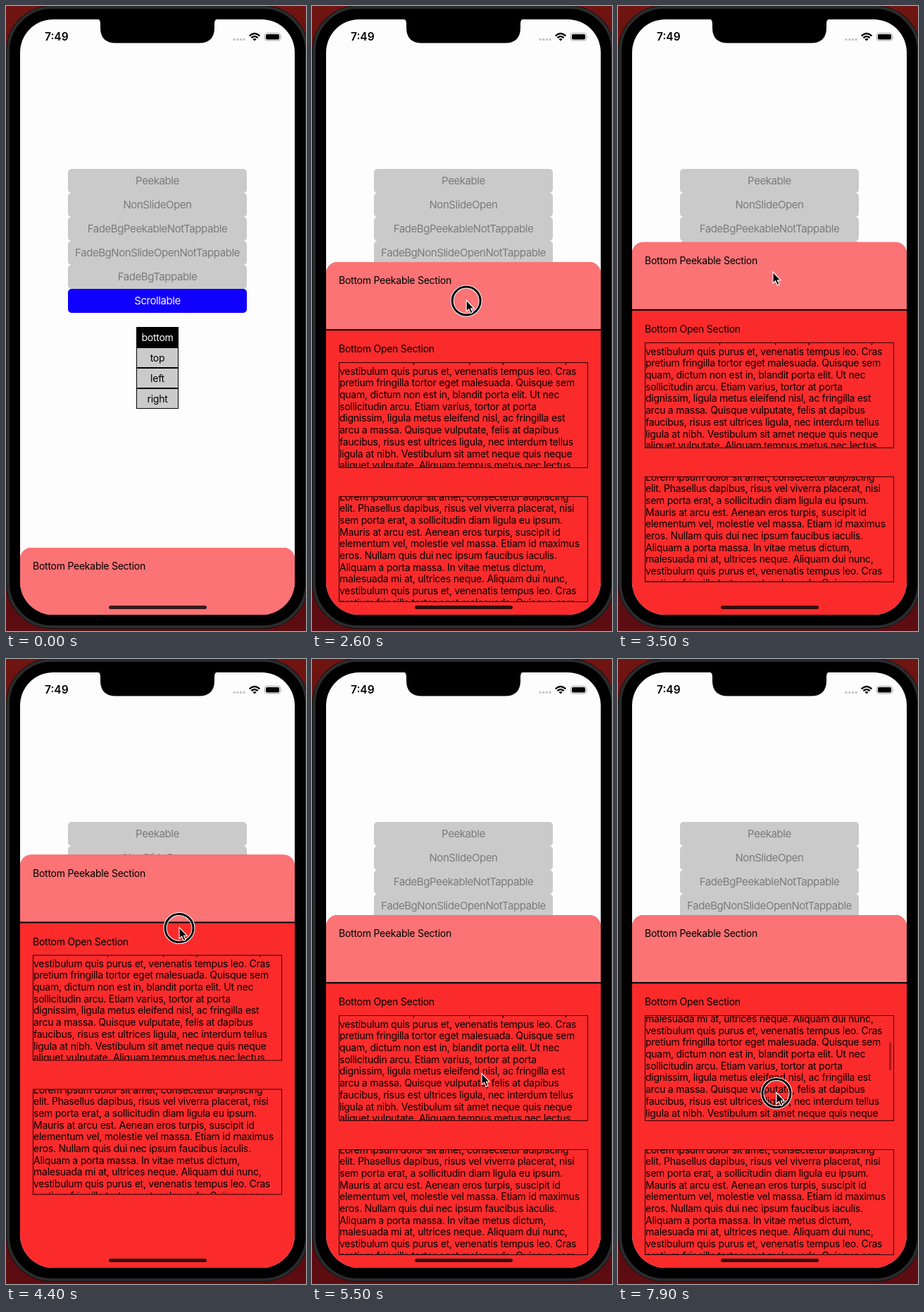
An HTML page that plays this animation: 426 px wide and 886 px high, repeating every 8000 ms.

```html
<!DOCTYPE html>
<html lang="en">
<head>
<meta charset="utf-8">
<title>Bottom drawer</title>
<style>
  html, body { margin: 0; width: 100%; height: 100%; overflow: hidden; }
  body {
    position: relative;
    background: linear-gradient(#701511, #4c0c10 30%, #4c0c10 70%, #5e0d11);
    font: 14px/16.7px Inter, "Liberation Sans", sans-serif;
    letter-spacing: -.25px;
    color: #000;
  }
  body * { box-sizing: border-box; }
  .abs, .phone, .screen, .modes, .sides, .sheet, .sheet > *, .pointer { position: absolute; }

  .phone {
    left: 1px; top: 0; width: 428px; height: 882px;
    border: 4px solid #2b2b2d; border-radius: 64px;
    background: #000;
    box-shadow: 0 0 0 1px #111;
  }
  .screen {
    left: 20px; top: 19px; width: 390px; height: 844px;
    border-radius: 47px; overflow: hidden; background: #fdfdfd;
  }

  .modes { left: 68px; top: 212px; width: 254px; }
  .modes div {
    height: 34px; border-radius: 5px; background: #cacaca; color: #7b7b7b;
    font-size: 15px; line-height: 34px; letter-spacing: -.43px;
    text-align: center; white-space: nowrap;
  }
  .modes .on { background: #1000ff; color: #f4f2ff; }

  .sides { left: 165px; top: 436px; width: 60px; }
  .sides div {
    height: 29px; border: 1px solid #000; background: #cacaca;
    line-height: 27px; text-align: center;
  }
  .sides .on { background: #000; color: #fff; }

  .sheet {
    left: 0; top: -19px; width: 390px; height: 900px;
    border-radius: 16px 16px 0 0; overflow: hidden; background: #fb2b2c;
  }
  .peek { left: 0; top: 0; width: 100%; height: 97px; background: #fb7375; border-bottom: 2px solid #000; }
  .label { left: 18px; white-space: nowrap; }
  .list { left: 18px; width: 354px; height: 150px; border: 1px solid #2c0405; overflow: hidden; }
  .copy { position: absolute; left: 0; white-space: pre; }
  .thumb {
    position: absolute; right: 3px; top: 37px; width: 3px; height: 40px;
    border-radius: 2px; background: #a81a1c;
  }

  svg { position: absolute; left: 0; top: 0; overflow: visible; }
  .time { left: 55px; top: 34px; font-size: 15.5px; line-height: 20px; font-weight: 600; letter-spacing: 0; }
  .home { left: 146px; top: 850px; width: 139px; height: 5px; border-radius: 3px; background: #000; opacity: .78; }
  .pointer { left: 0; top: 0; }
</style>
</head>
<body>
<div class="phone"></div>
<div class="screen">
  <div class="modes"></div>
  <div class="sides"></div>
  <div class="sheet">
    <div class="peek"></div>
    <div class="label" style="top:18px">Bottom Peekable Section</div>
    <div class="label" style="top:115px">Bottom Open Section</div>
    <div class="list" style="top:142px"><div class="copy" id="first"></div><div class="thumb"></div></div>
    <div class="list" style="top:332px"><div class="copy" id="second" style="top:-8.5px"></div></div>
  </div>
</div>

<svg width="426" height="886">
  <path d="M128 18Q134 18 134 25V30.5Q134 52.5 156 52.5H274Q296 52.5 296 30.5V25Q296 18 302 18Z"/>
  <path d="M324 47.5H339" stroke="#c4c4c4" stroke-width="3.4" stroke-linecap="round" stroke-dasharray="0 4.7"/>
  <g fill="none" stroke="#000" stroke-width="2.3">
    <path d="M345.7 42.3Q353 35.6 360.3 42.3"/>
    <path d="M348.4 45.2Q353 41 357.6 45.2"/>
  </g>
  <path d="M353 49.6L350.4 46.9Q353 44.9 355.6 46.9Z"/>
  <rect x="367.5" y="38.5" width="22" height="10.5" rx="3" fill="none" stroke="#a0a0a0"/>
  <rect x="369" y="40" width="19" height="7.5" rx="1.8"/>
  <path d="M391 42Q392.6 43.7 391 45.6Z" fill="#a0a0a0"/>
</svg>
<div class="abs time">7:49</div>
<div class="abs home"></div>

<div class="pointer">
  <svg width="1" height="1">
    <g class="ring" fill="none">
      <circle r="20" stroke="#fff" stroke-width="5"/>
      <circle r="20" stroke="#000" stroke-width="3"/>
    </g>
    <path d="M0 -1V15L3.6 11.7L6.3 17.8L9 16.6L6.4 10.8H11.2Z" stroke="#fff" stroke-width="1.1"/>
  </svg>
</div>

<script>
const LOOP = 8000;
const PEEK = 768, OPEN = 363, LINE = 16.7;
const $ = s => document.querySelector(s);

const fill = (sel, names, on) => {
  $(sel).innerHTML = names.map((n, i) => `<div${i === on ? ' class="on"' : ''}>${n}</div>`).join('');
};
fill('.modes', ['Peekable', 'NonSlideOpen', 'FadeBgPeekableNotTappable',
  'FadeBgNonSlideOpenNotTappable', 'FadeBgTappable', 'Scrollable'], 5);
fill('.sides', ['bottom', 'top', 'left', 'right'], 0);

const lorem = `Lorem ipsum dolor sit amet, consectetur adipiscing
elit. Phasellus dapibus, risus vel viverra placerat, nisi
sem porta erat, a sollicitudin diam ligula eu ipsum.
Mauris at arcu est. Aenean eros turpis, suscipit id
elementum vel, molestie vel massa. Etiam id maximus
eros. Nullam quis dui nec ipsum faucibus iaculis.
Aliquam a porta massa. In vitae metus dictum,
malesuada mi at, ultrices neque. Aliquam dui nunc,
vestibulum quis purus et, venenatis tempus leo. Cras
pretium fringilla tortor eget malesuada. Quisque sem
quam, dictum non est in, blandit porta elit. Ut nec
sollicitudin arcu. Etiam varius, tortor at porta
dignissim, ligula metus eleifend nisl, ac fringilla est
arcu a massa. Quisque vulputate, felis at dapibus
faucibus, risus est ultrices ligula, nec interdum tellus
ligula at nibh. Vestibulum sit amet neque quis neque
aliquet vulputate. Aliquam tempus metus nec lectus`;
$('#first').textContent = $('#second').textContent = lorem;

// Eased 0 to 1 between times a and b.
const ramp = (t, a, b) => {
  const u = Math.min(1, Math.max(0, (t - a) / (b - a)));
  return u * u * (3 - 2 * u);
};
const place = (el, x, y) => { el.style.transform = `translate(${x}px, ${y}px)`; };
const show = (el, on) => { el.style.visibility = on ? 'visible' : 'hidden'; };

const sheet = $('.sheet'), first = $('#first'), thumb = $('.thumb');
const pointer = $('.pointer'), ring = $('.ring');

function draw(t) {
  // Finger travel: open the sheet, overpull it twice, then scroll the list.
  const open = (PEEK - OPEN) * ramp(t, 1200, 2200);
  const pull = 40 * ramp(t, 2700, 3150);
  const pull2 = 85.5 * ramp(t, 3950, 4400);
  const scroll = 9 * ramp(t, 6000, 6600);

  // The sheet follows each pull and settles back once released.
  place(sheet, 0, PEEK - open
    - pull * (1 - ramp(t, 3375, 3725))
    - pull2 * (1 - ramp(t, 4600, 4950)));
  place(first, 0, -7.8 * LINE + scroll);
  thumb.style.opacity = ramp(t, 6000, 6150);

  // The pointer adds its free glides to the same travel.
  const arrive = ramp(t, 600, 1050), regrip = ramp(t, 3550, 3900);
  const toList = ramp(t, 4700, 5350), drift = ramp(t, 6900, 7800);
  place(pointer,
    400 - 184 * arrive + 4 * ramp(t, 1200, 3200) + 26 * regrip - 5 * toList - 16 * drift,
    870 - 47 * arrive - open - pull + 89 * regrip - pull2 + 207 * toList + scroll + 18 * drift);
  show(pointer, t >= 700);
  show(ring, t >= 1150 && t < 3375 || t >= 3900 && t < 4650 || t >= 5950);
}

const tick = () => {
  draw(performance.now() % LOOP);
  requestAnimationFrame(tick);
};
tick();
</script>
</body>
</html>
```
